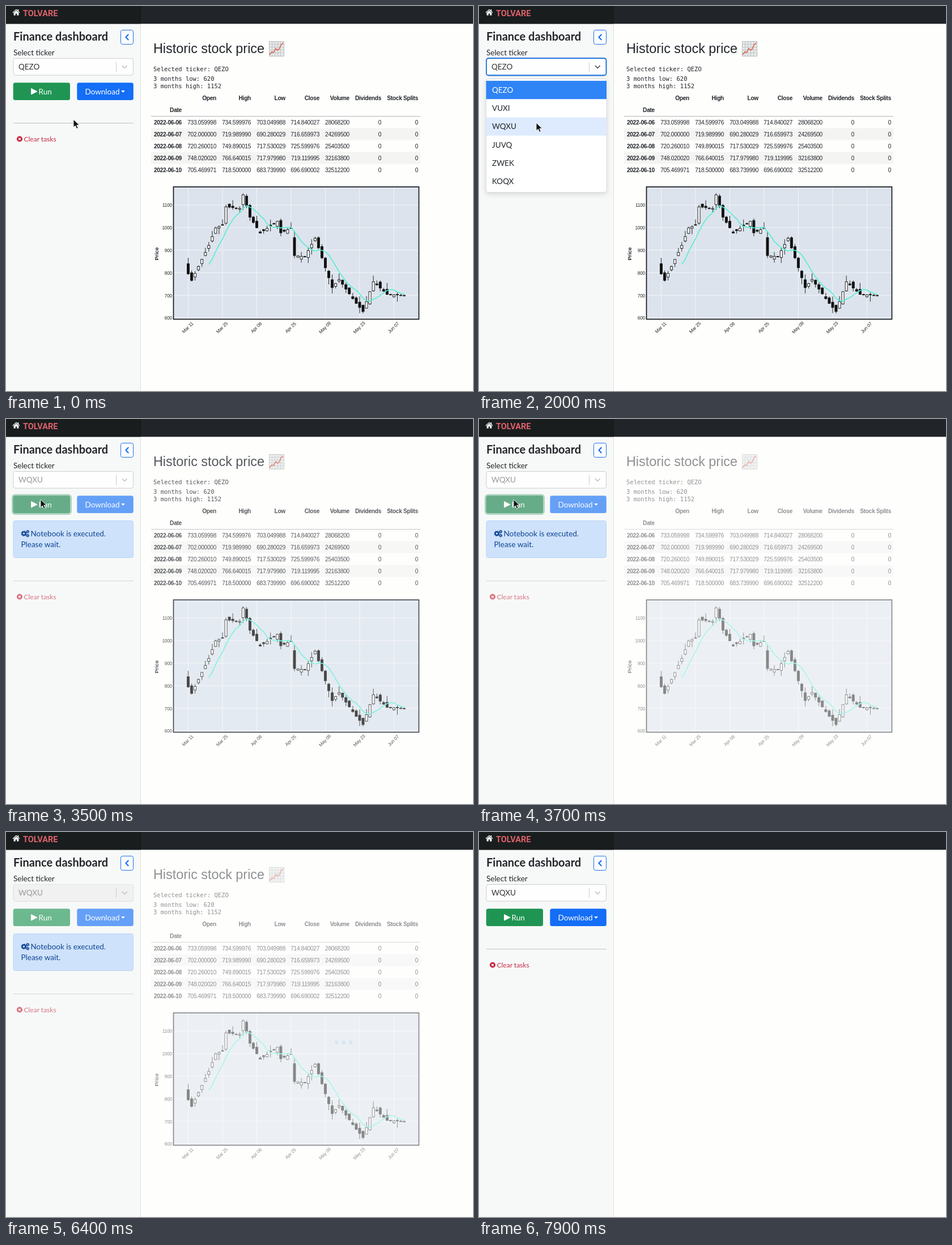
An HTML page for the animation above (8000 ms loop, 824 by 679 pixels).

```html
<!DOCTYPE html>
<html lang="en">
<head>
<meta charset="utf-8">
<title>Finance dashboard</title>
<style>
html, body { margin: 0; width: 100%; height: 100%; overflow: hidden; background: #fefefd; }
svg { display: block; }
text { white-space: pre; }
.ui { font: 13.5px Lato, "Open Sans", sans-serif; fill: #212529; }
.sans { font-family: "Liberation Sans", Arial, sans-serif; fill: #212529; }
.mono { font: 10.5px "DejaVu Sans Mono", monospace; fill: #212529; }
.table { font-size: 10.2px; letter-spacing: -.3px; text-anchor: end; }
.axis { font-size: 8.2px; letter-spacing: -.15px; fill: #262626; }
.bold { font-weight: 700; }
.white { fill: #fff; }

/* One 8 s clock for everything; most states switch hard. */
.t { animation: 8s step-end -40ms infinite; }
.v1 { animation-name: first; }
.v2 { animation-name: second; }
.v2 text { fill: #333; animation: 8s step-end -40ms infinite grey; }
.hover { animation-name: hover; }
.focus { animation-name: focus; }
.ring { animation-name: ring; }
.off { animation-name: off; }
.menu { animation-name: menu; }
.caret { animation-name: caret; }
.option { animation-name: option; }
.dim { animation-name: dim; }
.low { animation-name: dim, drop; }
.busy { animation-name: busy; }
.press { animation-name: press; }
.glow { animation-name: glow; }
.page { animation-name: page; }
.veil { animation-name: veil; animation-timing-function: linear; }
.cursor { animation-name: cursor; animation-timing-function: ease-in-out; }
.dots { animation-name: dots; }
.dot { animation: 8s linear calc(var(--d) - 40ms) infinite tint, 8s linear calc(var(--d) - 40ms) infinite slide; }

@keyframes first { 0% { opacity: 1 } 30%, 100% { opacity: 0 } }
@keyframes second { 0% { opacity: 0 } 30%, 100% { opacity: 1 } }
@keyframes grey { 0% { fill: #333 } 42.5% { fill: #999 } 98.75%, 100% { fill: #333 } }
@keyframes hover { 0% { opacity: 0 } 13.75% { opacity: 1 } 17.5%, 100% { opacity: 0 } }
@keyframes focus { 0% { opacity: 0 } 17.5% { opacity: 1 } 41.25%, 100% { opacity: 0 } }
@keyframes ring { 0% { opacity: 0 } 18.75% { opacity: 1 } 41.25%, 100% { opacity: 0 } }
@keyframes off { 0% { opacity: 0 } 47.5% { opacity: 1 } 98.75%, 100% { opacity: 0 } }
@keyframes menu { 0% { opacity: 0 } 17.5% { opacity: 1 } 30%, 100% { opacity: 0 } }
@keyframes caret { 0% { opacity: 0 } 17.5% { opacity: 1 } 22.5%, 100% { opacity: 0 } }
@keyframes option {
  0% { opacity: 0; transform: none }
  23.75% { opacity: 1; transform: none }
  25% { opacity: 1; transform: translateY(32.2px) }
  30%, 100% { opacity: 0; transform: none }
}
@keyframes dim { 0% { opacity: 1 } 42.5% { opacity: .64 } 98.75%, 100% { opacity: 1 } }
@keyframes drop { 0% { transform: none } 42.5% { transform: translateY(79px) } 98.75%, 100% { transform: none } }
@keyframes busy { 0% { opacity: 0 } 42.5% { opacity: 1 } 98.75%, 100% { opacity: 0 } }
@keyframes press { 0% { opacity: 0 } 38.75% { opacity: 1 } 53.75%, 100% { opacity: 0 } }
@keyframes glow { 0% { opacity: 0 } 41.25% { opacity: 1 } 47.5% { opacity: .5 } 48.75%, 100% { opacity: 0 } }
@keyframes page { 0% { opacity: 1 } 98.75%, 100% { opacity: 0 } }
@keyframes veil { 0%, 42.5% { opacity: 0 } 46.25%, 100% { opacity: .5 } }
@keyframes cursor {
  0%, 10.5% { transform: translate(119px, 200px); opacity: 1 }
  13.75%, 22% { transform: translate(143px, 106px) }
  25%, 31% { transform: translate(101px, 206px) }
  32.5%, 37% { transform: translate(95px, 198px) }
  39.5%, 53% { transform: translate(61px, 142px) }
  57%, 100% { transform: translate(160px, 15px); opacity: 1 }
  57.1%, 99.9% { opacity: 0 }
}
@keyframes dots {
  0% { opacity: 0 }
  53% { opacity: 1 }
  74.4% { opacity: 1; animation-timing-function: linear }
  81.25% { opacity: 0 }
  90% { opacity: 1 }
  98.75%, 100% { opacity: 0 }
}
@keyframes tint {
  0%, 53.75% { opacity: 0; fill: #28bdb8 }
  58.75% { opacity: 1; fill: #28b0c1 }
  65%, 82% { opacity: 1; fill: #269dc6 }
  82.1%, 91.25% { opacity: 0; fill: #28bdb8 }
  96.25%, 100% { opacity: 1; fill: #28b0c1 }
}
@keyframes slide {
  0%, 53.75% { transform: translateX(14px); animation-timing-function: cubic-bezier(.2, .5, .4, 1) }
  65%, 82% { transform: none }
  82.1%, 91.25% { transform: translateX(14px); animation-timing-function: cubic-bezier(.2, .5, .4, 1) }
  100% { transform: none }
}
</style>
</head>
<body>
<svg width="824" height="679" viewBox="0 0 824 679">
  <rect width="824" height="679" fill="#fefefd"/>

  <g class="t page">
    <text class="sans" x="260" y="83" font-size="23.36">Historic stock price</text>
    <rect x="464.5" y="62.5" width="26" height="26" fill="#e6e8e8" stroke="#b9bcbc"/>
    <path d="M469.5 63v25m5-25v25m5-25v25m5-25v25M465 67.5h25m-25 5h25m-25 5h25m-25 5h25" stroke="#bfc4c6" stroke-width=".9"/>
    <path d="M465 86l4-5 3 1 4-7 3 3 3-2 3-7 4-4" fill="none" stroke="#dc5a4e" stroke-width="1.5"/>
    <g class="mono">
      <text x="260" y="115">Selected ticker: QEZO</text>
      <text x="260" y="132">3 months low: 620</text>
      <text x="260" y="145">3 months high: 1152</text>
    </g>
    <g id="table" class="sans table"></g>
    <g id="chart" class="sans"></g>
    <rect class="t veil" x="238" y="31" width="586" height="648" fill="#fefefd"/>
  </g>

  <g class="t dots">
    <circle class="dot" style="--d:0s" cx="583.5" cy="371" r="3.4"/>
    <circle class="dot" style="--d:.3s" cx="596" cy="371" r="3.4"/>
    <circle class="dot" style="--d:.6s" cx="608.5" cy="371" r="3.4"/>
  </g>

  <rect y="31" width="237" height="648" fill="#f7f9f8"/>
  <path d="M237.5 31V679" stroke="#dddfdf"/>
  <rect width="824" height="31.4" fill="#212529"/>
  <rect width="237" height="31.4" fill="#191d1e"/>
  <path d="M237.5 0V31" stroke="#15181a"/>
  <path d="M11.5 11.3L18 5.4l2.6 2.4V6h1.6v3.2l2.3 2.1-.8.9L18 7l-5.7 5.2zM13.6 12L18 8l4.4 4v4.6h-3.2v-3.3h-2.4v3.3h-3.2z" fill="#fff"/>
  <text class="bold" x="30" y="17.5" font-family="Roboto, sans-serif" font-size="14.5" fill="#de626b">TOLVARE</text>

  <g class="ui">
    <text class="bold" x="13" y="60.5" font-size="20">Finance dashboard</text>
    <rect x="202.5" y="42.5" width="22" height="25" rx="3" fill="#fcfdfd" stroke="#1d6ef0"/>
    <path d="M216.2 50l-4.7 5 4.7 5" fill="none" stroke="#146ef6" stroke-width="2.1"/>
    <text x="13" y="87">Select ticker</text>

    <rect id="field" x="13" y="92.5" width="211.5" height="29.5" rx="3.5" fill="#fefefe" stroke="#ccc"/>
    <rect class="t off" x="13" y="92.5" width="211.5" height="29.5" rx="3.5" fill="#f0f1f0" stroke="#e3e4e4"/>
    <rect class="t hover" x="13" y="92.5" width="211.5" height="29.5" rx="3.5" fill="none" stroke="#b3b3b3"/>
    <rect class="t focus" x="13" y="92.5" width="211.5" height="29.5" rx="3.5" fill="none" stroke="#3a86e8" stroke-width="1.3"/>
    <rect class="t ring" x="13" y="92" width="211.5" height="30.5" rx="4" fill="none" stroke="#2f7de0" stroke-width="2"/>
    <path d="M194.5 99V116" stroke="#ccc"/>
    <path id="arrow" d="M204.8 105.2l4.4 4.4 4.4-4.4" fill="none" stroke="#c6c6c6" stroke-width="1.7"/>
    <use href="#arrow" class="t ring" style="filter:brightness(.5)"/>
    <g class="t v1"><text x="22" y="112" fill="#333">QEZO</text></g>
    <g class="t v2"><text x="22" y="112">WQXU</text></g>
    <path class="t caret" d="M22.5 100V114.5" stroke="#222"/>

    <g class="t dim">
      <rect x="12.7" y="135.2" width="100.3" height="30.8" rx="3.5" fill="#209553"/>
      <rect class="t press" x="12.7" y="135.2" width="100.3" height="30.8" rx="3.5" fill="#17804a"/>
      <rect class="t glow" x="11.5" y="134" width="103" height="33.5" rx="4.5" fill="none" stroke="#198754" stroke-opacity=".5" stroke-width="3"/>
      <path d="M44.5 145.5v10.5l10.5-5.2z" fill="#fff" stroke="#fff" stroke-linejoin="round"/>
      <text class="white" x="57.5" y="155.5">Run</text>
      <rect x="125.3" y="135.2" width="99.5" height="30.8" rx="3.5" fill="#146ef6"/>
      <text class="white" x="139.5" y="155.5">Download</text>
      <path d="M203 149h7l-3.5 3.7z" fill="#fff"/>
    </g>

    <g class="t low">
      <path d="M13 206.5H225" stroke="#c0c2c2"/>
      <circle cx="24" cy="234.5" r="5" fill="#c6253e"/>
      <path d="M22.2 232.7l3.6 3.6m0-3.6l-3.6 3.6" stroke="#fff" stroke-width="1.4"/>
      <text x="31.5" y="238.5" style="font-size:12px;fill:#c62b44">Clear tasks</text>
    </g>

    <g class="t busy">
      <rect x="13" y="179.5" width="211.5" height="65" rx="3.5" fill="#cfe2fb" stroke="#b6d3f8"/>
      <g fill="none" stroke="#0c4494">
        <circle cx="31.5" cy="202" r="2.9" stroke-width="2.2"/>
        <circle cx="31.5" cy="202" r="4.3" stroke-width="1.4" stroke-dasharray="1.8 1.58"/>
        <g id="cog">
          <circle cx="38.2" cy="198.7" r="1.7" stroke-width="1.5"/>
          <circle cx="38.2" cy="198.7" r="2.6" stroke-dasharray="1.3 1.42"/>
        </g>
        <use href="#cog" y="6.9"/>
      </g>
      <g style="fill:#0c4494">
        <text x="43.5" y="207">Notebook is executed.</text>
        <text x="26.5" y="226">Please wait.</text>
      </g>
    </g>

    <g class="t menu">
      <rect x="12.5" y="128.5" width="212.5" height="200" rx="4" fill="#fff" stroke="#dcdddd" style="filter:drop-shadow(0 3px 5px rgba(0,0,0,.13))"/>
      <rect x="12.6" y="131.9" width="212.4" height="32.3" fill="#2f84f6"/>
      <rect class="t option" x="12.6" y="164.2" width="212.4" height="32.2" fill="#deebff"/>
      <g id="options"></g>
    </g>
  </g>

  <path class="t cursor" d="M0 0V14.2l3.3-3.1 2.4 5.3 2.5-1.1-2.4-5.2h4.7z" fill="#111" stroke="#fff" stroke-width=".9"/>
</svg>

<script>
const put = (id, parts) => { document.getElementById(id).innerHTML = parts.join(''); };
const text = (x, y, s, attrs = '') => `<text x="${x}" y="${y}" ${attrs}>${s}</text>`;
const rect = (x, y, w, h, attrs) => `<rect x="${x}" y="${y}" width="${w}" height="${h}" ${attrs}/>`;
const path = (d, attrs) => `<path d="${d}" fill="none" ${attrs}/>`;

put('options', ['QEZO', 'VUXI', 'WQXU', 'JUVQ', 'ZWEK', 'KOQX'].map((name, i) =>
  text(23, 153 + i * 32.2, name, i ? '' : 'class="white"')));

// Table
const edges = [310, 371, 432, 493, 553, 606, 662, 727];
const heads = ['Open', 'High', 'Low', 'Close', 'Volume', 'Dividends', 'Stock Splits'];
const rows = [
  '733.059998 734.599976 703.049988 714.840027 28068200',
  '702.000000 719.989990 690.280029 716.659973 24269500',
  '720.260010 749.890015 717.530029 725.599976 25403500',
  '748.020020 766.640015 717.979980 719.119995 32163800',
  '705.469971 718.500000 683.739990 696.690002 32512200'
];
const bold = 'class="bold"';
const cells = (row, r) => [`2022-06-${String(6 + r).padStart(2, '0')}`, ...row.split(' '), 0, 0];
put('table', [
  ...[1, 3].map(r => rect(256, 194.5 + r * 21, 475, 21, 'fill="#f4f4f3"')),
  path('M256 194.5H731', 'stroke="#b5b6b6"'),
  ...heads.map((s, i) => text(edges[i + 1], 166, s, bold)),
  text(edges[0], 187, 'Date', bold),
  ...rows.flatMap((row, r) => cells(row, r).map((s, c) =>
    text(edges[c], 208.7 + r * 21, s, c ? '' : bold)))
]);

// Chart: closes run along a few turning points, the rest of each candle is seeded
const turns = [
  [0, 795], [1, 766], [6, 921], [8, 999], [10, 1011], [11, 1092], [15, 1085], [16, 1145], [18, 1046],
  [21, 976], [26, 1028], [27, 977], [30, 998], [31, 876], [34, 871], [37, 953], [39, 866], [42, 734],
  [44, 770], [49, 664], [51, 628], [54, 760], [58, 704], [63, 700]
];
const closeAt = i => {
  const k = Math.max(1, turns.findIndex(([day]) => day >= i));
  const [[d0, v0], [d1, v1]] = [turns[k - 1], turns[k]];
  return v0 + (v1 - v0) * (i - d0) / (d1 - d0);
};

let seed = 7;
const random = () => (seed = seed * 16807 % 2147483647) / 2147483647;
const wick = () => 2 + 28 * random() ** 2;

const closes = Array.from({ length: 64 }, (_, i) => closeAt(i));
const px = i => 321.5 + i * 6.05;
const py = v => 550 - (v - 600) * 0.398;
const f = n => n.toFixed(1);

const candle = (close, i) => {
  const before = i ? closes[i - 1] : 840;
  const open = before + (close - before) * random() * 0.3 + (i && (random() - 0.5) * 30);
  const top = Math.max(open, close), low = Math.min(open, close), x = px(i);
  const high = Math.min(1152, top + wick()), deep = Math.max(620, low - wick());
  const height = Math.max(1, py(low) - py(top));
  return path(`M${f(x)} ${f(py(high))}V${f(py(deep))}`, 'stroke="#151515" stroke-width=".9"') +
    rect(f(x - 2), f(py(top)), 4, f(height), `fill="${close < open ? '#111' : '#fff'}" stroke="#111" stroke-width=".9"`);
};

const span = 7;
const average = closes.slice(span - 1).map((_, i) =>
  closes.slice(i, i + span).reduce((a, b) => a + b) / span);
const line = average.map((v, i) => `${f(px(i + span - 1))} ${f(py(v))}`).join('L');

const ticks = [600, 700, 800, 900, 1000, 1100];
const dates = ['Mar 11', 'Mar 25', 'Apr 08', 'Apr 25', 'May 09', 'May 23', 'Jun 07'];
const grid = 'stroke="#f6f8fb" stroke-width=".9"';

put('chart', [
  rect(296, 319.5, 432, 233, 'fill="#dce3ec"'),
  ...ticks.map(v => path(`M296 ${py(v)}H728`, grid)),
  ...dates.map((_, i) => path(`M${px(i * 10)} 320V552`, grid)),
  ...closes.map(candle),
  path('M' + line, 'stroke="#52efd2" stroke-width="1.6" stroke-linejoin="round"'),
  rect(295.5, 319, 433, 233.4, 'fill="none" stroke="#14171a" stroke-width="1.7"'),
  ...ticks.map(v => text(293, py(v) + 3.3, v, 'class="axis" text-anchor="end"')),
  ...dates.map((s, i) => text(0, 2.9, s,
    `class="axis" text-anchor="middle" transform="translate(${px(i * 10) - 1} 567) rotate(-45)"`)),
  text(0, 3, 'Price', 'class="bold" font-size="9.4" text-anchor="middle" transform="translate(266 437) rotate(-90)"')
]);
</script>
</body>
</html>
```
